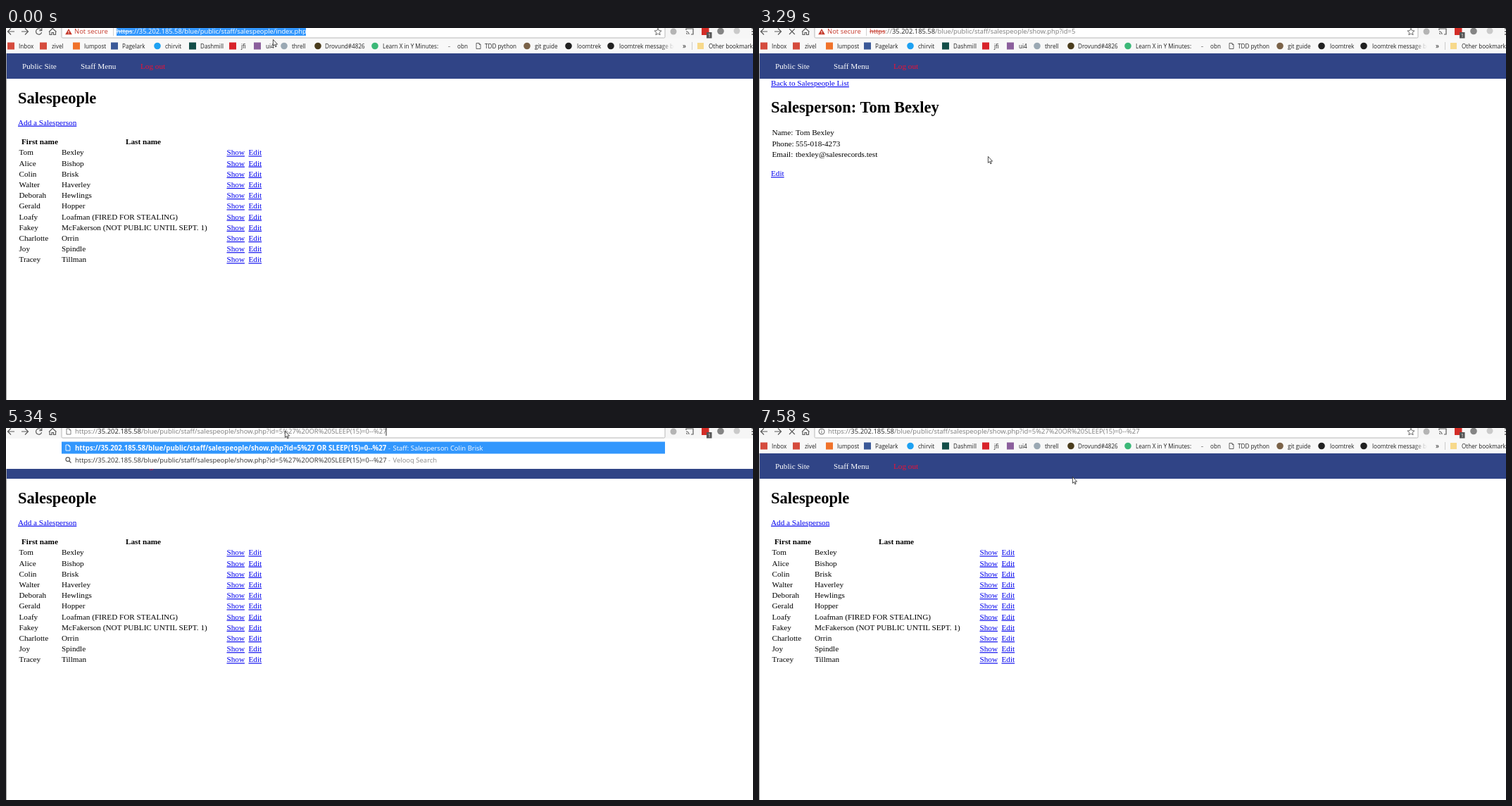
An HTML page that plays this animation: 1061x528 px, repeating every 8000 ms.

```html
<!DOCTYPE html>
<html lang="en">
<head>
<meta charset="utf-8">
<title>Salespeople</title>
<style>
  html, body { margin: 0; width: 100%; height: 100%; overflow: hidden; background: #fff; }
  svg { display: block; }
  .ui { font-family: "Open Sans", "Noto Sans", sans-serif; }
  .page { font: 11.2px "Liberation Serif", serif; }
  .page .link { fill: #00e; text-decoration: underline; }
  .page .head { font-size: 22.5px; font-weight: bold; }
  .b { font-weight: bold; }
  .strike { text-decoration: line-through; }
  .line { fill: none; stroke: #5a5a5a; stroke-width: 1.2; }
</style>
</head>
<body>
<script>
const LOOP = 8000;

const text = (x, y, s, attrs = '') => `<text x="${x}" y="${y}" ${attrs}>${s}</text>`;
const rect = (x, y, w, h, fill, attrs = '') =>
  `<rect x="${x}" y="${y}" width="${w}" height="${h}" fill="${fill}" ${attrs}/>`;
const disc = (x, y, r, fill) => `<circle cx="${x}" cy="${y}" r="${r}" fill="${fill}"/>`;
const line = (d, attrs = '') => `<path class="line" d="${d}" ${attrs}/>`;
const part = (id, body, attrs = '') => `<g id="${id}" ${attrs}>${body}</g>`;
const link = (x, y, s) => text(x, y, s, 'class="link"');
const sheet = (x, y, color) =>
  line(`M${x - 3} ${y - 4}h4l2 2v6h-6zM${x + 1} ${y - 4}v2h2`, `style="stroke:${color};stroke-width:.9"`);

// Addresses
const host = '35.202.185.58';
const folder = '/blue/public/staff/salespeople/';
const query = 'show.php?id=5%27%20OR%20SLEEP(15)=0--%27';
const address = (x, scheme, file, size) => text(x, 8.3,
  `${scheme}://<tspan fill="#222">${host}</tspan>${folder}${file}`, `font-size="${size}" fill="#7b7b7b"`);
const unsafe = '<tspan class="strike" fill="#c5392b">https</tspan>';

// Pages
const people = [
  ['Tom', 'Bexley'], ['Alice', 'Bishop'], ['Colin', 'Brisk'], ['Walter', 'Haverley'],
  ['Deborah', 'Hewlings'], ['Gerald', 'Hopper'], ['Loafy', 'Loafman (FIRED FOR STEALING)'],
  ['Fakey', 'McFakerson (NOT PUBLIC UNTIL SEPT. 1)'], ['Charlotte', 'Orrin'],
  ['Joy', 'Spindle'], ['Tracey', 'Tillman']
];

const listPage = text(17, 107, 'Salespeople', 'class="head"') +
  link(17, 137.7, 'Add a Salesperson') +
  text(22, 165.2, 'First name', 'class="b"') + text(170, 165.2, 'Last name', 'class="b"') +
  people.map(([first, last], i) => {
    const y = 180.4 + i * 15.2;
    return text(18.5, y, first) + text(79, y, last) + link(313.5, y, 'Show') + link(344.5, y, 'Edit');
  }).join('');

const details = [['Name:', 'Tom Bexley'], ['Phone:', '555-018-4273'], ['Email:', 'tbexley@salesrecords.test']];
const showPage = link(17, 82, 'Back to Salespeople List') +
  text(17, 119.6, 'Salesperson: Tom Bexley', 'class="head"') +
  details.map(([label, value], i) =>
    text(18.5, 152.4 + i * 15.2, label) + text(52, 152.4 + i * 15.2, value)).join('') +
  link(17, 210.3, 'Edit');

const nav = rect(0, 36, 1061, 36, '#304486') +
  text(23, 58, 'Public Site', 'fill="#fff"') + text(106, 58, 'Staff Menu', 'fill="#fff"') +
  text(191, 58, 'Log out', 'fill="#f01035"');

// Bookmarks: icon centre, colour, round?, label x, label
const marks = [
  [7, '#d54b3d', 0, 18, 'Inbox'], [53, '#d54b3d', 0, 65, 'zivel'], [100, '#f0722a', 0, 111, 'lumpost'],
  [154, '#3b5998', 0, 165, 'Pagelark'], [215, '#1da1f2', 1, 226, 'chirvit'], [265, '#134d48', 0, 276, 'Dashmill'],
  [322, '#d8232a', 0, 334, 'jfi'], [357, '#8b5f9c', 0, 369, 'ui4'], [395, '#9aa8b3', 1, 406, 'threll'],
  [443, '#4a3c1c', 1, 453, 'Drovund#4826'], [524, '#3cb878', 1, 535, 'Learn X in Y Minutes:'],
  [740, '#7a6248', 1, 751, 'git guide'], [799, '#222', 1, 811, 'loomtrek']
];
const bookmarks = rect(0, 15, 1061, 21, '#f8f8f8') +
  marks.map(([cx, color, round, x, label]) =>
    (round ? disc(cx, 25.5, 4.8, color) : rect(cx - 5, 20.5, 10, 10, color)) + text(x, 28.5, label)).join('') +
  rect(628, 26, 3, 1, '#999') + text(641, 28.5, 'obn') +
  sheet(671, 25.5, '#555') + text(680, 28.5, 'TDD python') +
  disc(859, 25.5, 4.8, '#222') + text(871, 28.5, 'loomtrek message bo', 'fill="url(#fade)"') +
  text(961, 28.5, '»', 'font-size="10"') + rect(974, 20, 1, 11, '#ccc') +
  rect(982, 21, 9, 9, '#f7d98b') + text(998, 28.5, 'Other bookmarks');

// Toolbar
const toolbar = rect(0, 0, 1061, 15, '#f6f6f6') +
  line('M12 5H3M7 .5L2.5 5L7 9.5') +
  line('M62 5.5V9.5H65V6.5H67.5V9.5H70.5V5.5M61 5.5L66.2 .6L71.5 5.5') +
  rect(79, -5, 857, 19, '#fff', 'stroke="#b8b8b8" rx="1.5"') +
  disc(948, 5, 4.5, '#b4b4b4') +
  line('M966 3V1H976V9H973M966 5a4 4 0 0 1 4 4M966 7.5a1.5 1.5 0 0 1 1.5 1.5') +
  rect(988, 0, 10.5, 10, '#d32d27') + rect(995, 6, 7.5, 8.5, '#555') +
  text(997, 12.9, '1', 'font-size="6.8" fill="#fff"') +
  disc(1015, 4.5, 4.8, '#858585') + disc(1038, 4, 4.5, '#cacaca') +
  [1, 5, 9].map(y => disc(1060, y, 1, '#5a5a5a')).join('');

const popup = rect(0, 15, 1061, 43, '#fff') +
  rect(79, 19.5, 857, 17, '#3297fd') +
  part('hover', rect(79, 37, 857, 17, '#ebebeb')) +
  sheet(88, 28, '#fff') +
  text(98, 31.5, `https://${host}${folder}show.php?id=5%27 OR SLEEP(15)=0--%27`,
    'class="b" font-size="9.7" fill="#fff"') +
  text(543, 31.5, '-', 'fill="#d6eaff"') + text(549.5, 31.5, 'Staff: Salesperson Colin Brisk', 'fill="#fff"') +
  line('M90 47L92.5 49.5M90.6 44.5a2.8 2.8 0 1 1-5.6 0a2.8 2.8 0 1 1 5.6 0') +
  text(98, 48.8, `https://${host}${folder}${query}`, 'fill="#333"') +
  text(543, 48.8, '-', 'fill="#999"') + text(549.5, 48.8, 'Velooq Search', 'fill="#8a8a8a"');

const warning = '<path d="M89 1L93.8 9.3H84.2Z" fill="#c5392b"/>' + rect(88.5, 4, 1, 2.6, '#fff') +
  rect(88.5, 7.3, 1, 1, '#fff') + text(97, 8.3, 'Not secure', 'fill="#c5392b"') +
  rect(152, 0, 1, 11, '#d0d0d0');
const info = line('M93 5a4 4 0 1 1-8 0a4 4 0 1 1 8 0M89 4.5V7.4M89 2.4V3.5', 'style="stroke-width:.9"');
const selected = rect(157, 0, 269, 11, '#3297fd') +
  text(157, 8.3, `<tspan class="strike">https</tspan>://${host}${folder}index.php`, 'font-size="9.35" fill="#fff"');

document.body.innerHTML = `<svg width="1061" height="528" viewBox="0 0 1061 528">
  <defs><linearGradient id="fade" gradientUnits="userSpaceOnUse" x1="930" x2="949">
    <stop stop-color="#222"/><stop offset="1" stop-color="#222" stop-opacity="0"/>
  </linearGradient></defs>` +
  rect(0, 0, 1061, 528, '#fff') +
  `<g class="page">${nav}${part('list', listPage)}${part('show', showPage)}</g>` +
  rect(0, 36, 1, 492, '#a6a6a6') +
  `<g class="ui" font-size="9.47">` +
    part('marks', bookmarks, 'font-size="8.15" fill="#222"') + part('popup', popup) + toolbar +
    part('next', line('M22 5H31M27 .5L31.5 5L27 9.5')) +
    part('reload', line('M50.2 3A4.1 4.1 0 1 0 50.6 6.2M50.8 0V3.6H47.2')) +
    part('stop', line('M43 1.2L50.8 9M50.8 1.2L43 9')) +
    part('star', line('M926 .4L927.4 3.7L931 4L928.3 6.3L929.1 9.8L926 8L922.9 9.8L923.7 6.3L921 4L924.6 3.7Z',
      'style="stroke-width:.9"')) +
    part('warn', warning) + part('info', info) + part('doc', sheet(89, 5, '#777')) +
    part('sel', selected) + part('index', address(157, unsafe, 'index.php', 9.35)) +
    part('entry', address(157, unsafe, 'show.php?id=5', 9.38)) +
    part('typed', address(98, 'https', query, 9.47)) +
    part('caret', rect(539.5, 0, 1, 11, '#333')) +
  `</g>` +
  part('cursor', '<path d="M.4 .4V9.4L2.4 7.6L3.8 10.8L5.2 10.2L3.8 7.1H6.6Z" fill="#fff" stroke="#222" stroke-width=".8"/>') +
  '</svg>';

// Visible parts from each time on
const scenes = [
  [0, 'list marks star warn sel reload next'],
  [1500, 'list marks star warn index stop next'],
  [1770, 'show marks star warn entry stop'],
  [1890, 'show marks star warn entry reload'],
  [3290, 'show marks star warn entry stop next'],
  [3560, 'list marks star warn index reload next'],
  [4620, 'list marks star warn sel reload next'],
  [5340, 'list popup doc typed reload next'],
  [7580, 'list marks star info typed stop next']
].map(([t, names]) => [t, names.split(' ')]);

// Pointer position from each time on
const moves = [
  [0, 379, 16], [120, 280, 179], [270, 280, 224], [420, 301, 205], [540, 322, 186], [660, 318, 189],
  [810, 325, 182], [3800, 341, 128], [3920, 374, 42], [4040, 396, -1], [4190, 391, -1], [4310, 396, -1],
  [4620, 396, 4], [5920, 397, 53], [6080, 398, 81], [6220, 398, 95], [6340, 398, 106], [6500, 412, 81],
  [6650, 428, 75], [6770, 445, 69]
];
const carets = [[0, 0], [5340, 1], [5770, 0], [6340, 1], [6770, 0], [7300, 1], [7580, 0]];

const at = (steps, t) => steps.findLast(s => s[0] <= t);
const el = id => document.getElementById(id);
const toggle = (node, on) => { node.style.display = on ? '' : 'none'; };
const parts = [...new Set(scenes.flatMap(s => s[1]))].map(el);
const [cursor, caret, hover, next] = ['cursor', 'caret', 'hover', 'next'].map(el);

function draw(t) {
  const names = at(scenes, t)[1];
  for (const p of parts) toggle(p, p === next || names.includes(p.id));
  next.setAttribute('opacity', names.includes('next') ? 1 : 0.25);
  toggle(caret, at(carets, t)[1]);
  toggle(hover, t >= 5920 && t < 6080);
  const [, x, y] = at(moves, t);
  cursor.setAttribute('transform', `translate(${x} ${y})`);
}

const start = performance.now();
function tick() {
  draw((performance.now() - start) % LOOP);
  requestAnimationFrame(tick);
}
tick();
</script>
</body>
</html>
```
